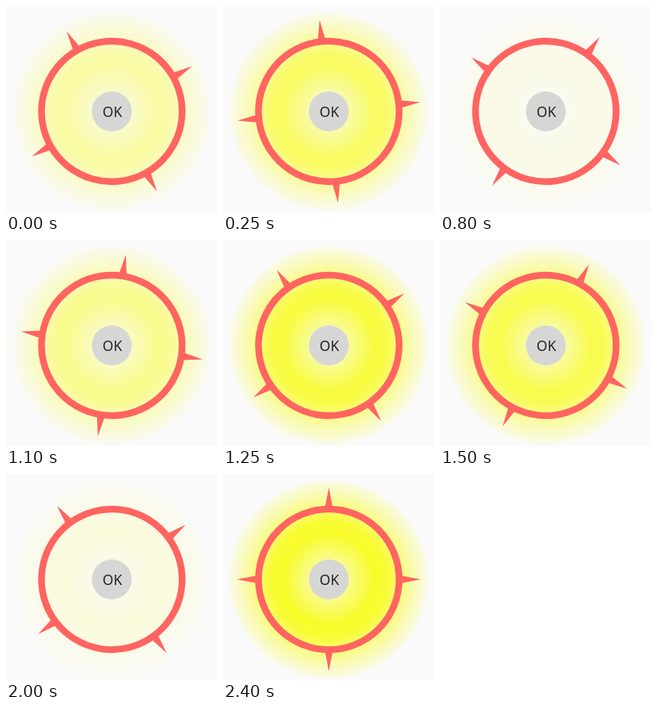
An HTML page with a canvas for the animation above (2.45 s loop, 264 by 258 pixels).

```html
<!DOCTYPE html>
<html lang="en">
<head>
<meta charset="utf-8">
<title>Pulsing compass ring</title>
<style>
  html, body { margin: 0; width: 264px; height: 258px; overflow: hidden; background: #fafafa; }
  canvas { display: block; }
  #ok {
    position: absolute; left: 108px; top: 107px; width: 50px; height: 50px;
    line-height: 51px; text-align: center; color: #242424;
    font: 17.5px/51px "Noto Sans", "Open Sans", sans-serif;
  }
</style>
</head>
<body>
<canvas id="stage" width="264" height="258"></canvas>
<div id="ok">OK</div>
<script>
const ctx = document.getElementById('stage').getContext('2d');
const CX = 132.4, CY = 132;
const LOOP = 2450, HOLD = 250, STEP = 50;
const RED = '#ff6461';

// Swing phase in degrees at given steps; 180 is one full turn, the next 180 turns back.
const PHASE = [[0, 80.6], [1, 117.9], [8, 236.8], [18, 452.8], [26, 589], [36, 765.3], [44, 900]];

function phaseAt(step) {
  let k = 1;
  while (k < PHASE.length - 1 && step > PHASE[k][0]) k++;
  const [s0, a0] = PHASE[k - 1], [s1, a1] = PHASE[k];
  return a0 + (a1 - a0) * (step - s0) / (s1 - s0);
}

function disc(r, fill) {
  ctx.fillStyle = fill;
  ctx.beginPath();
  ctx.arc(0, 0, r, 0, Math.PI * 2);
  ctx.fill();
}

function glow(power) {
  const g = ctx.createRadialGradient(0, 0, 0, 0, 0, 124);
  const stop = (pos, a) => g.addColorStop(pos, `rgba(248,252,18,${a * power})`);
  stop(0, 0.15);
  stop(0.22, 0.5);
  stop(0.46, 0.9);
  stop(0.58, 0.86);
  stop(0.76, 0.48);
  stop(1, 0.07);
  disc(124, g);
}

function ring(turn) {
  ctx.save();
  ctx.rotate(turn);
  ctx.strokeStyle = ctx.fillStyle = RED;
  ctx.lineWidth = 8.4;
  ctx.beginPath();
  ctx.arc(0, 0, 88, 0, Math.PI * 2);
  ctx.stroke();
  for (let i = 0; i < 4; i++) {
    ctx.beginPath();
    ctx.moveTo(-5, -89);
    ctx.lineTo(0, -115);
    ctx.lineTo(5, -89);
    ctx.fill();
    ctx.rotate(Math.PI / 2);
  }
  ctx.restore();
}

function draw(ms) {
  const step = ms < HOLD ? 0 : 1 + Math.floor((ms - HOLD) / STEP);
  const p = (1 - Math.cos(phaseAt(step) * Math.PI / 180)) / 2;
  ctx.setTransform(1, 0, 0, 1, 0, 0);
  ctx.fillStyle = '#fafafa';
  ctx.fillRect(0, 0, 264, 258);
  ctx.translate(CX, CY);
  glow(p);
  ring(p * Math.PI * 2);
  disc(25, '#d6d7d5');
}

const start = performance.now();
function tick() {
  draw((performance.now() - start) % LOOP);
  requestAnimationFrame(tick);
}
tick();
</script>
</body>
</html>
```
